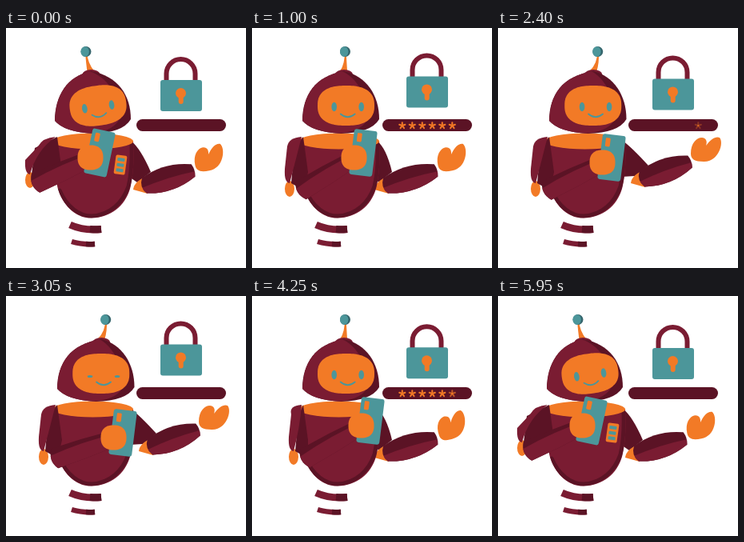
Recreate the animation shown at these times as an HTML page with a canvas. Size 300 px wide and 300 px high, loop 6 s.

```html
<!DOCTYPE html>
<html lang="en">
<head>
<meta charset="utf-8">
<title>Robot typing a password</title>
<style>
html, body { margin: 0; width: 100%; height: 100%; overflow: hidden; background: #fff; }
canvas { display: block; width: 300px; height: 300px; }
</style>
</head>
<body>
<canvas id="stage" width="300" height="300"></canvas>
<script>
const ctx = document.getElementById('stage').getContext('2d');
const WINE = '#7a1c32', DARK = '#5b1325', ORANGE = '#f27a26', TEAL = '#4c969a', SLATE = '#35656c';
const LOOP = 6000;

const clamp = v => Math.max(0, Math.min(1, v));
const mix = (a, b, u) => a + (b - a) * u;

// Eased switch from 0 to 1 that begins at the given time.
function step(t, begin) {
  const u = clamp((t - begin) / 250);
  return u * u * (3 - 2 * u);
}

// front: facing ahead; lift: right arm raised; drop: phone lowered; slide: phone moved over.
function poseAt(t) {
  const front = step(t, 250) - step(t, 4270);
  const lift = step(t, 1400) - step(t, 3080);
  const drop = step(t, 2500) - step(t, 3080);
  const slide = step(t, 3080) - step(t, 4270);
  return {
    front, slide,
    turn: front + lift / 2,
    open: clamp((Math.abs(t - 3050) - 40) / 60),
    phone: [117 + 22 * front + 3 * lift + 4 * drop + 9 * slide, 156 + 6 * lift + 9 * drop],
    panel: [143 + 5 * slide, 171 - 6 * front + 6 * drop],
    elbow: [173 - 6 * front + 13 * lift, 197 - 8 * lift],
    wrist: [234 - 4 * front + 10 * lift, 178 - 11 * lift],
    handTilt: -12 + 12 * lift - 8 * slide
  };
}

function fill(color, path) {
  ctx.fillStyle = color;
  ctx.fill(typeof path === 'string' ? new Path2D(path) : path);
}
function line(color, width, d) {
  ctx.strokeStyle = color;
  ctx.lineWidth = width;
  ctx.stroke(new Path2D(d));
}
function oval(color, x, y, rx, ry = rx) {
  const p = new Path2D();
  p.ellipse(x, y, rx, ry, 0, 0, 7);
  fill(color, p);
}
function box(color, x, y, w, h, r) {
  const p = new Path2D();
  p.roundRect(x, y, w, h, r);
  fill(color, p);
}
function local(x, y, deg, draw) {
  ctx.save();
  ctx.translate(x, y);
  ctx.rotate(deg * Math.PI / 180);
  draw();
  ctx.restore();
}
function within(path, draw) {
  ctx.save();
  ctx.clip(path);
  draw();
  ctx.restore();
}

// Tapered limb with a bulging middle; the light tone starts at `split` across it.
function limb([x1, y1], [x2, y2], r1, r2, bulge, split) {
  const len = Math.hypot(x2 - x1, y2 - y1), mid = len / 2;
  const deg = Math.atan2(y2 - y1, x2 - x1) * 180 / Math.PI;
  const shape = new Path2D(`M0 ${-r1}Q${mid} ${-bulge} ${len} ${-r2}Q${len + 3} 0 ${len} ${r2}
    Q${mid} ${bulge} 0 ${r1}Q${-r1 * 0.7} 0 0 ${-r1}Z`);
  local(x1, y1, deg, () => {
    fill(DARK, shape);
    within(shape, () => fill(WINE, `M-20 ${split + 3}Q${mid} ${split - 5} ${len + 20} ${split + 3}V50H-20Z`));
  });
}

function drawLock(t) {
  local(0, -2.3 + 2.3 * Math.cos(t * Math.PI / 1000), 0, () => {
    line(WINE, 6, 'M200.5 66V57A17.7 17.7 0 0 1 236.5 57V66');
    box(TEAL, 193, 65, 52, 39, 3);
    oval(ORANGE, 218.5, 81.5, 6.5);
    line(ORANGE, 6, 'M218.7 84V92');
  });
}

function drawStars(t) {
  box(DARK, 163, 114, 112, 15, 7.5);
  for (let i = 0; i < 6; i++) {
    const ramp = begin => clamp((t - begin - i * 150) / 150);
    ctx.globalAlpha = ramp(100) - ramp(1550) + ramp(3400) - ramp(4950);
    for (let k = 0; k < 5; k++) {
      local(187.8 + 12.5 * i, 122, k * 72, () => line(ORANGE, 2, 'M0 0V-3.8'));
    }
  }
  ctx.globalAlpha = 1;
}

function drawSprings() {
  ctx.lineCap = 'butt';
  line(WINE, 9, 'M80 246Q98 254 119 251.500');
  line(DARK, 9, 'M105 251.500Q112 252 119 251.500');
  line(WINE, 6.5, 'M82 267Q95 271 111 270');
  line(DARK, 6.5, 'M100 270Q105 270.500 111 270');
  ctx.lineCap = 'round';
}

function dome(l, r, top) {
  return new Path2D(`M${l} 116C${l} 84 ${l + 16} 60 ${top} 54C${r - 16} 60 ${r} 84 ${r} 114
    Q${r - 10} 131 ${(l + r) / 2} 132Q${l + 12} 130 ${l} 116Z`);
}

function superellipse(rx, ry, power) {
  const p = new Path2D(), bend = v => Math.sign(v) * Math.abs(v) ** (2 / power);
  for (let a = 0; a < 2 * Math.PI; a += 0.05) p.lineTo(rx * bend(Math.cos(a)), ry * bend(Math.sin(a)));
  return p;
}

function drawHead({ front, turn, open }) {
  const ball = 100 + 16.5 * turn, top = 106.5 + 8.5 * turn;
  const l = 61 + 2 * turn, r = 156 + 3 * turn;
  fill(ORANGE, `M${ball - 1} 30Q${ball} 44 ${top - 5} 54H${top + 4}Q${ball + 2} 44 ${ball + 1} 30Z`);
  oval(SLATE, ball, 29.5, 6.5);
  oval(TEAL, ball - 1.3, 29.5, 5.2, 6.3);
  oval(WINE, top, 58, 11, 6);

  const head = dome(l, r, top);
  fill(DARK, head);
  within(head, () => fill(WINE, dome(l, r - 14, top - 3)));

  local(115 + 2.5 * turn, 97, -8 * (1 - front), () => {
    fill(ORANGE, superellipse(35.5, 25, 2.5));
    ctx.translate(2.2 * turn, 0);
    for (const x of [-17, 17]) oval(TEAL, x, 1.5 + 2 * (1 - open), 3.3, 1.5 + 4.3 * open);
    line(TEAL, 1.8, 'M-9 10.500Q0 18 9 10.500');
  });
}

function drawBody(p) {
  const body = new Path2D('M62 141C61 168 60 190 67 207C76 228 92 238 107 237.500C131 237 149 222 155 201C160 182 160 160 159 141Z');
  fill(WINE, body);
  within(body, () => line(DARK, 5, 'M67 203C76 224 92 235 107 235C130 234 146 218 153 198Q158 178 157 146'));
  oval(ORANGE, 108.5, 141.5, 50.5, 10);
  local(...p.panel, 8, () => {
    box(ORANGE, -7, -12, 14, 24, 2);
    for (let i = 0; i < 3; i++) box(TEAL, -4.5, -8.5 + 6.7 * i, 9, 4, 1);
  });
}

function drawRightArm({ elbow, wrist, handTilt }) {
  const [x, y] = elbow;
  fill(DARK, `M156 141Q168 150 ${x + 8} ${y - 17}L${x - 9} ${y - 4}L154 186Z`);
  fill(ORANGE, `M${x + 6} ${y - 13}Q${x - 13} ${y - 6} ${x - 14} ${y + 5}L${x + 4} ${y + 10}Z`);
  local(wrist[0] + 20, wrist[1] - 15, handTilt, () => fill(ORANGE,
    'M-19 5C-19 -8 -12 -15 -5 -15C2 -14 1 -8 0 -5C6 -13 12 -17 17 -15C23 -8 15 16 -3 15C-14 15 -19 12 -19 5Z'));
  limb(elbow, wrist, 10, 8, 21, 1);
}

function drawLeftArm({ front, slide, phone }) {
  const shift = 5 * slide;
  const x = mix(24, 41, front) + shift, y = mix(177, 188, front);
  const elbow = [mix(37, 61, front) + shift, mix(194, 203, front)];
  oval(ORANGE, x + 6, y + 13, 6, 10);
  fill(DARK, `M64 136L70 180L${elbow[0] + 4} ${elbow[1]}L${x + 8} ${y + 6}L${x + 12} 150Z`);
  fill(WINE, `M62 136Q46 137 ${mix(40, 44, front) + shift} 148L${x} ${y - 12}Q${x - 1} ${y + 5} ${x + 6} ${y + 6}
    Q${x + 14} ${y - 24} 62 136Z`);
  limb(elbow, [phone[0] - 11, phone[1] + 7], 13, 10, 13, -6);
}

function drawPhone({ front, phone: [x, y] }) {
  local(x, y, 12 - 5 * front, () => {
    box(TEAL, -14.5, -28.5, 29, 57, 3);
    box(ORANGE, -10, -24, 6, 11, 1.5);
  });
  local(x - 11.5, y + 6, 0, () => fill(ORANGE, superellipse(16, 15.5, 2.4)));
}

function draw(t) {
  ctx.fillStyle = '#fff';
  ctx.fillRect(0, 0, 300, 300);
  const pose = poseAt(t);
  drawLock(t);
  drawSprings();
  drawStars(t);
  for (const part of [drawRightArm, drawBody, drawHead, drawLeftArm, drawPhone]) part(pose);
}

const start = performance.now();
function tick() {
  draw((performance.now() - start) % LOOP);
  requestAnimationFrame(tick);
}
tick();
</script>
</body>
</html>
```
